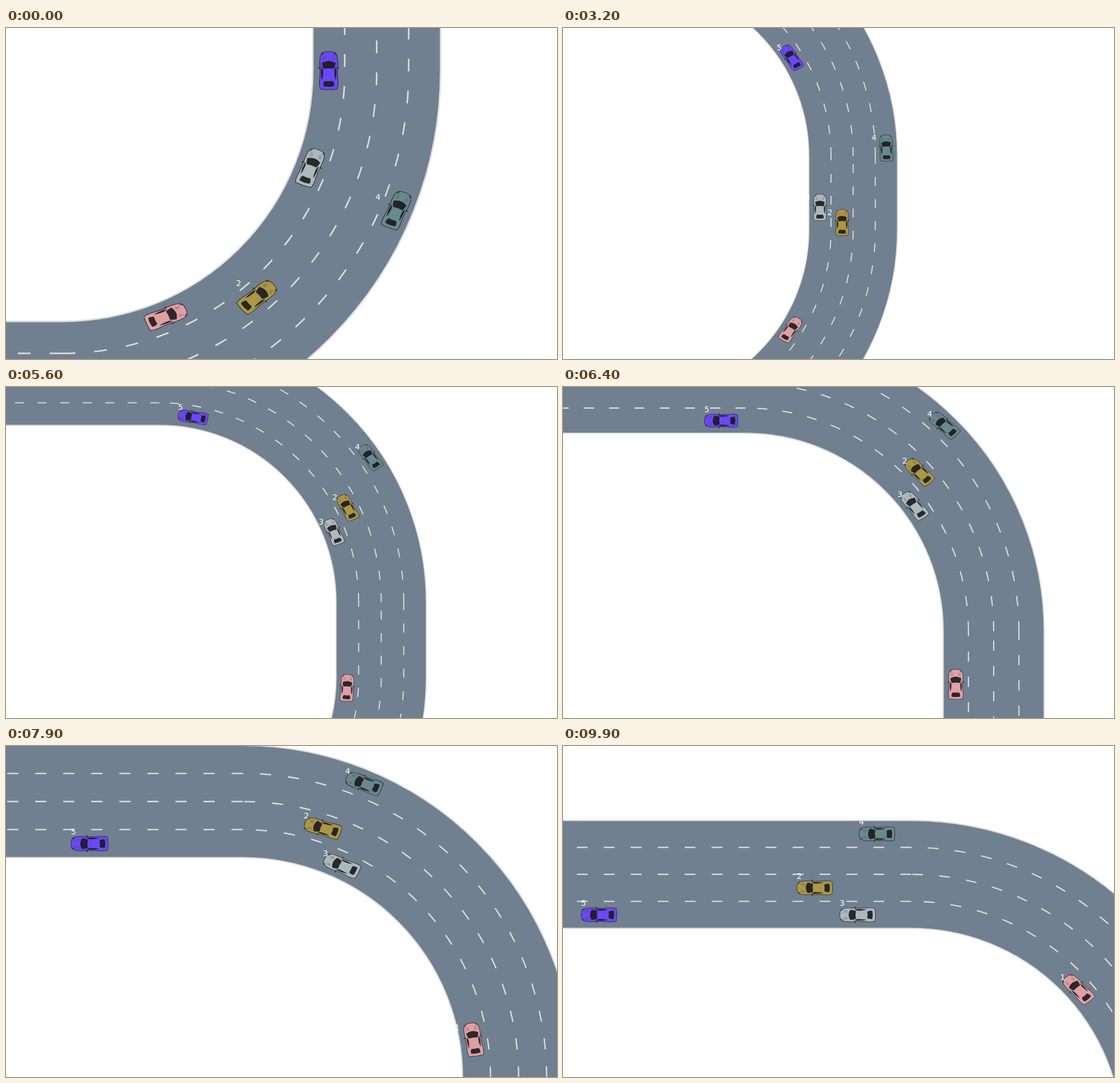
Write an HTML page with a canvas that moves like this. It is 966 px wide and 580 px high and loops after 10000 ms.

```html
<!DOCTYPE html>
<html lang="en">
<head>
<meta charset="utf-8">
<title>Cars on a bend</title>
<style>
  html, body { margin: 0; width: 100%; height: 100%; overflow: hidden; background: #fff; }
  canvas { display: block; }
</style>
</head>
<body>
<canvas id="stage" width="966" height="580"></canvas>
<script>
const W = 966, H = 580, LOOP = 10000;
const ctx = document.getElementById('stage').getContext('2d');

// Track in world units: two quarter bends around (0,0) and (0,-SIDE).
const SIDE = 50, INNER = 117.5, LANE = 15, MARGIN = 20, REACH = 400;
const QUARTER = Math.PI / 2;

// Distance travelled by each car at these steps; `start` is its first speed.
const STEPS = [0, 15, 31, 45, 62, 77, 97];
const cars = [
  { lane: 0, color: '#dea0a5', start: 2.8, dist: [50, 88.9, 125.1, 162.6, 214.8, 266.7, 338.1] },
  { lane: 1, color: '#aa9748', start: 2.6, dist: [99.8, 152.3, 224.8, 291.8, 373.8, 446.4, 543.5] },
  { lane: 0, color: '#abb9bf', start: 1.2, dist: [150, 173.6, 211.5, 259.8, 326.3, 388.1, 472.5] },
  { lane: 3, color: '#67898f', start: 3.4, dist: [200, 256.4, 322.4, 381.2, 453.6, 517.6, 603.1] },
  { lane: 0, color: '#6a48f5', start: 2.6, dist: [196.5, 247.8, 316.6, 378.9, 457.1, 524.6, 616.4] }
];

const gap = i => STEPS[i + 1] - STEPS[i];
for (const car of cars) {
  const speed = i => (car.dist[i + 1] - car.dist[i]) / gap(i);
  const last = STEPS.length - 1;
  car.slope = STEPS.map((_, i) =>
    i === 0 ? car.start :
    i === last ? speed(last - 1) :
    (speed(i - 1) * gap(i) + speed(i) * gap(i - 1)) / (gap(i) + gap(i - 1)));
}

// Smooth cubic through the known distances.
function travelled({ dist, slope }, n) {
  let i = 0;
  while (i < STEPS.length - 2 && n > STEPS[i + 1]) i++;
  const h = gap(i), u = (n - STEPS[i]) / h, w = 1 - u;
  return w * w * (1 + 2 * u) * dist[i] + u * u * (3 - 2 * u) * dist[i + 1]
    + h * u * w * (w * slope[i] - u * slope[i + 1]);
}

function place(car, n) {
  const r = INNER + (car.lane + 0.5) * LANE, arc = r * QUARTER, d = travelled(car, n);
  if (d > 2 * arc + SIDE) return { x: 2 * arc + SIDE - d, y: -SIDE - r, turn: -QUARTER };
  const up = Math.min(Math.max(d - arc, 0), SIDE);
  const a = (d - up) / r;
  return { x: r * Math.sin(a), y: r * Math.cos(a) - up, turn: QUARTER - a };
}

function lanePath(r) {
  const p = new Path2D();
  p.moveTo(-REACH, r);
  p.arc(0, 0, r, QUARTER, 0, true);
  p.arc(0, -SIDE, r, 0, -QUARTER, true);
  p.lineTo(-REACH, -SIDE - r);
  return p;
}

// Each subpath restarts the dash pattern.
function dashPath(r) {
  const p = new Path2D();
  p.moveTo(0, r);
  p.lineTo(-REACH, r);
  p.moveTo(0, r);
  p.arc(0, 0, r, QUARTER, 0, true);
  p.lineTo(r, -SIDE);
  p.moveTo(r, -SIDE);
  p.arc(0, -SIDE, r, 0, -QUARTER, true);
  p.moveTo(0, -SIDE - r);
  p.lineTo(-REACH, -SIDE - r);
  return p;
}

const road = lanePath(INNER + 2 * LANE);
const edges = [0, 4].map(i => lanePath(INNER + i * LANE));
const dashes = [1, 2, 3].map(i => dashPath(INNER + i * LANE));

// Car parts, nose up, centred on the origin.
const body = new Path2D(`M-3.1-8.7C-2-9.7 2-9.7 3.1-8.7C4-7.6 4.1-5 4.05-3.2C3.8-1 3.8 2 4 4
  C4.25 6 4.2 8 3.7 9.2Q0 9.75-3.7 9.2C-4.2 8-4.25 6-4 4C-3.8 2-3.8-1-4.05-3.2C-4.1-5-4-7.6-3.1-8.7Z`);
const glass = new Path2D(`M-3.1-3.8Q0-5.8 3.1-3.8Q2.9-2.2 2.3-.9Q0-1.3-2.3-.9Q-2.9-2.2-3.1-3.8Z
  M-1.9 5.1Q0 5.4 1.9 5.1Q2.6 6.2 2.4 7.7Q0 8.3-2.4 7.7Q-2.6 6.2-1.9 5.1Z`);
const half = new Path2D(`M3.3-2Q3.6 1.5 3.1 4.6Q2.5 3.6 2.5-.2Z
  M3.9-1.8L4.8-1.4L4.7-1L3.9-1.3Z M2.2-9Q3.3-8.6 3.3-7.7Q2.6-8.2 2.2-9Z`);
const creases = new Path2D('M2.5-8Q2.2-6.6 2.5-5.2M1.5-7.4L2.3-5.6M1.2-6.4L1.9-5.3');

function drawCar(color, { x, y, turn }) {
  ctx.save();
  ctx.translate(x, y);
  ctx.scale(1.05, 0.945); // cars are slightly wider than tall on screen
  ctx.rotate(turn);
  ctx.fillStyle = color;
  ctx.fill(body);
  ctx.strokeStyle = '#25282c';
  ctx.lineWidth = 0.27;
  ctx.stroke(body);
  ctx.fillStyle = 'rgba(28,26,28,.9)';
  ctx.fill(glass);
  ctx.strokeStyle = 'rgba(90,50,60,.55)';
  ctx.lineWidth = 0.2;
  for (const side of [1, -1]) {
    ctx.scale(side, 1);
    ctx.fill(half);
    ctx.stroke(creases);
  }
  ctx.restore();
}

function drawRoad() {
  ctx.strokeStyle = '#708090';
  ctx.lineWidth = 4 * LANE;
  ctx.stroke(road);
  ctx.strokeStyle = '#dedede';
  ctx.lineWidth = 0.7;
  edges.forEach(p => ctx.stroke(p));
  ctx.setLineDash([6, 9]);
  dashes.forEach(p => ctx.stroke(p));
  ctx.setLineDash([]);
}

function draw(n) {
  const spots = cars.map(car => place(car, n));
  const xs = spots.map(p => p.x), ys = spots.map(p => p.y);
  const left = Math.min(...xs), right = Math.max(...xs);
  const top = Math.min(...ys), bottom = Math.max(...ys);

  // The camera keeps all cars in view.
  const zoom = Math.min(W / (right - left + 2 * MARGIN), H / (bottom - top + 2 * MARGIN));
  const dx = W / 2 - zoom * (left + right) / 2;
  const dy = H / 2 - zoom * (top + bottom) / 2;

  ctx.setTransform(1, 0, 0, 1, 0, 0);
  ctx.fillStyle = '#fff';
  ctx.fillRect(0, 0, W, H);
  ctx.setTransform(zoom, 0, 0, zoom, dx, dy);
  drawRoad();
  cars.forEach((car, i) => drawCar(car.color, spots[i]));

  ctx.setTransform(1, 0, 0, 1, 0, 0);
  ctx.fillStyle = '#fff';
  ctx.font = '14px "DejaVu Sans", sans-serif';
  spots.forEach((p, i) =>
    ctx.fillText(i + 1, dx + zoom * (p.x - 10), dy + zoom * (p.y - 5)));
}

// Ten steps a second, with a short hold at 0.6 s and 4.6 s.
function frame() {
  const tick = Math.floor(performance.now() % LOOP / 100);
  draw(tick - (tick >= 6) - (tick >= 46));
  requestAnimationFrame(frame);
}
frame();
</script>
</body>
</html>
```
